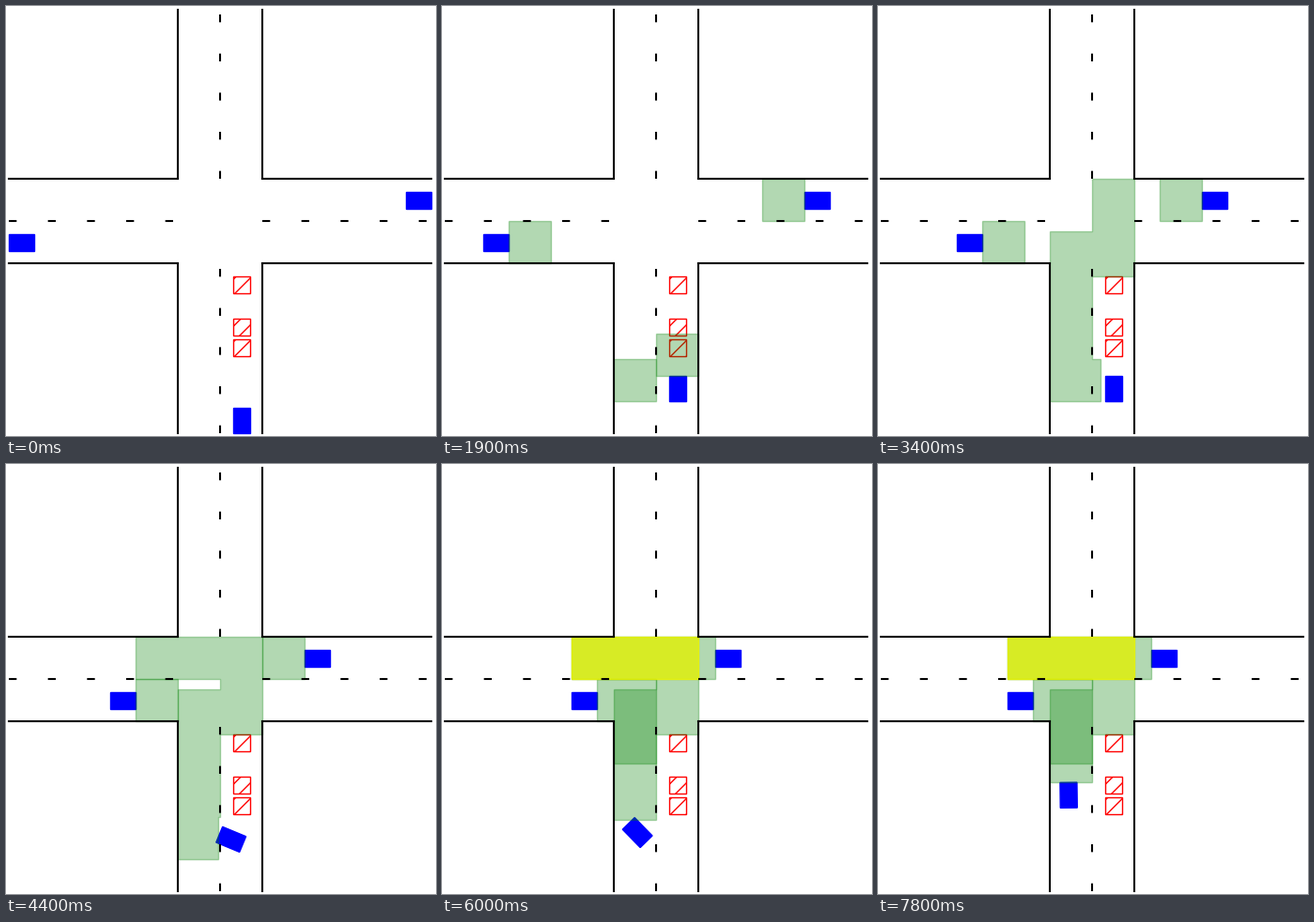
A matplotlib script that plays this animation: 458 by 458 pixels, repeating every 8 s.

```python
import math

import matplotlib.pyplot as plt
from matplotlib.animation import FuncAnimation
from matplotlib.patches import Polygon, Rectangle

SIZE, DPI = 458, 100
LANE, CAR_L, CAR_W, SPEED = 10, 6, 4, 1.5
STOP_Y, CELL_TOP, MERGE_LOW, MERGE_TOP = -42.5, -32.5, -13, -2.35
TURN, STRAIGHTEN = 16, 22  # steps at which the lower car starts to steer

# Simulation steps, in ticks of 100 ms
TICKS = [0, 4, 7, 9, 11, 14, 17, 19, 22, 24, 27, 29, 31, 34, 36, 39, 41,
         44, 47, 50, 53, 57, 60, 63, 66, 69, 72, 75, 78]

fig = plt.figure(figsize=((SIZE + 0.001) / DPI,) * 2, dpi=DPI, facecolor="white")
ax = fig.add_axes([0, 0, 1, 1])
ax.axis("off")
ax.set_xlim(-228.2 / 4.5, (SIZE - 228.2) / 4.5)
ax.set_ylim(-(SIZE - 229.44) / 4.5015, 229.44 / 4.5015)


def rect(x0, y0, x1, y1):
    return [(x0, y0), (x1, y0), (x1, y1), (x0, y1)]


def car(x, y, angle):
    c, s = math.cos(angle), math.sin(angle)
    box = rect(-CAR_L / 2, -CAR_W / 2, CAR_L / 2, CAR_W / 2)
    return [(x + c * u - s * v, y + s * u + c * v) for u, v in box]


def drive():
    """Poses (x, y, heading) of the lower car; heading halves toward its goal."""
    x, y, lean = LANE / 2, -50 + CAR_L / 2, 0.0
    poses = []
    for k in range(len(TICKS)):
        if 2 <= k <= 6:
            y += SPEED
        elif k >= TURN:
            goal = 90 if k < STRAIGHTEN else 0
            lean = (lean + goal) / 2
            x -= SPEED * math.sin(math.radians(lean))
            y += SPEED * math.cos(math.radians(lean))
        poses.append((x, y, math.radians(90 + lean)))
    return poses


def detour(k, x, y):
    """Outline of the space reserved by the lower car around the obstacles."""
    if k < 7:
        return None
    if k < 10:
        return rect(-LANE, STOP_Y, 0, CELL_TOP + LANE * (k - 7))
    if k < STRAIGHTEN - 1:
        edge = x - CAR_L / 2
        pts = [(-LANE, STOP_Y), (edge, STOP_Y), (edge, CELL_TOP), (0, CELL_TOP)]
    else:
        pts = [(-LANE, y + CAR_L / 2), (0, y + CAR_L / 2)]
    if k > 10:
        pts += [(0, MERGE_LOW), (LANE, MERGE_LOW)]
    if k == 11:
        pts += [(LANE, MERGE_TOP)]
    elif k in (12, 13):
        top = 7.5 if k == 12 else LANE
        pts += [(LANE, top), (0, top)]
    elif k > 13:
        end = -LANE if k == 14 else -2 * LANE
        pts += [(LANE, LANE), (end, LANE), (end, 0), (0, 0)]
    return pts + [(0, MERGE_TOP), (-LANE, MERGE_TOP)]


def left_zone(k, front):
    if k < 18:
        return rect(front, -LANE, front + LANE, 0)
    if k < 19:
        return rect(front, -LANE, 0, 0)
    return [(front, -LANE), (-LANE, -LANE), (-LANE, -2 * LANE),
            (0, -2 * LANE), (0, 0), (front, 0)]


def right_reach(tick, front):
    if tick < 45:
        return front - LANE
    return 0 if tick < 50 else -LANE if tick < 53 else -2 * LANE


def add_patch(color, alpha=None):
    return ax.add_patch(Polygon([(0, 0)] * 3, color=color, alpha=alpha))


def show(patch, pts):
    patch.set_visible(pts is not None)
    if pts is not None:
        patch.set_xy(pts)


# Roads
for sx in (-1, 1):
    for sy in (-1, 1):
        ax.plot([50 * sx, LANE * sx], [LANE * sy] * 2, "k", lw=1.5)
        ax.plot([LANE * sx] * 2, [50 * sy, LANE * sy], "k", lw=1.5)
for a, b in ((-50, -LANE), (LANE, 50)):
    ax.plot([a, b], [0, 0], "k", lw=1.5, ls=(0, (4, 16)))
    ax.plot([0, 0], [a, b], "k", lw=1.5, ls=(0, (4, 16)))

for y in (-15, -25, -30):
    ax.add_patch(Rectangle((3, y - 2), 4, 4, fill=False, edgecolor="red", hatch="//"))

cars = [add_patch("blue") for _ in range(3)]
ahead, path, west, east = [add_patch("green", 0.3) for _ in range(4)]
conflict = add_patch("yellow", 0.7)
POSES = drive()


def update(tick):
    k = sum(t <= tick for t in TICKS) - 1
    x, y, heading = POSES[k]
    moved = SPEED * min(max(k - 1, 0), 20)
    front = 50 - CAR_L - moved

    show(cars[0], car(-front - CAR_L / 2, -LANE / 2, 0))
    show(cars[1], car(front + CAR_L / 2, LANE / 2, 0))
    show(cars[2], car(x, y, heading))

    nose = y + CAR_L / 2
    reach = right_reach(tick, front)
    show(ahead, rect(0, nose, LANE, nose + LANE) if 1 <= k < 10 else None)
    show(path, detour(k, x, y))
    show(west, left_zone(k, -front) if k else None)
    show(east, rect(reach, 0, front, LANE) if k else None)
    show(conflict, rect(reach, 0, LANE, LANE) if tick >= 50 else None)
    return [*cars, ahead, path, west, east, conflict]


anim = FuncAnimation(fig, update, frames=80, interval=100, init_func=lambda: update(0),
                     repeat=True, repeat_delay=0)
plt.show()
```
